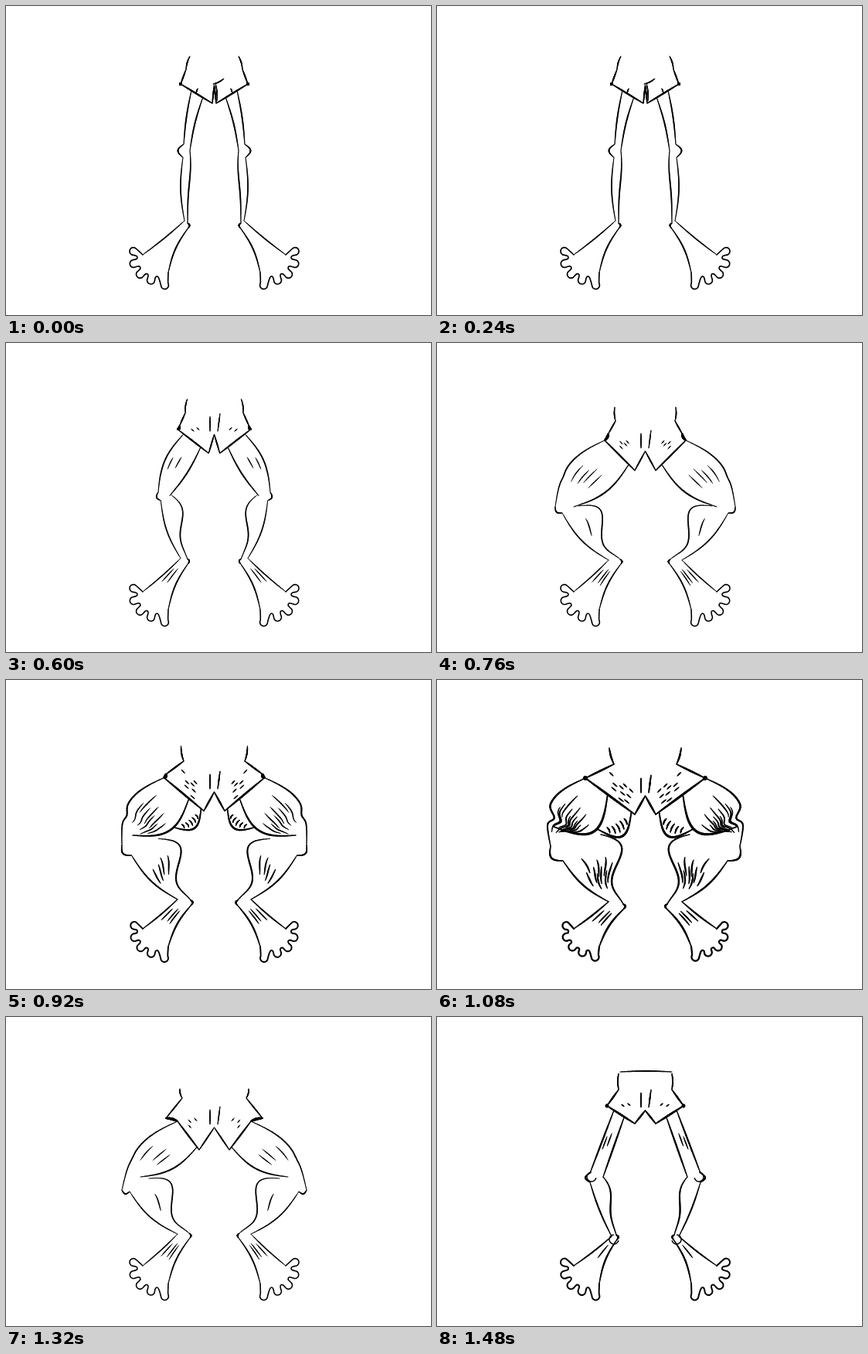
An HTML page with a canvas for the animation above (1.52 s loop, 550 by 400 pixels).

```html
<!DOCTYPE html>
<html lang="en">
<head>
<meta charset="utf-8">
<title>Squat</title>
<style>
html, body { margin: 0; width: 100%; height: 100%; overflow: hidden; background: #fff; }
canvas { display: block; width: 550px; height: 400px; }
</style>
</head>
<body>
<canvas id="stage" width="550" height="400"></canvas>
<script>
const LOOP = 1520, STEP = 40, AXIS = 539;
const ROOT = [177, 322], ARCH = [210, 345], SOLE = [195, 325];
const ctx = document.getElementById('stage').getContext('2d');

// Joints of the left leg. thigh, lower: how far the outer and inner lines bow inwards.
// grip: where the thigh meets the hem, from 0 (outside) to 1 (inside).
const stand = {
  ink: 1.7, muscle: 0, bone: 0, toe: 1, knob: -7,
  waist: [238, 65], belt: [233, 82], hip: [226, 101],
  hemOut: [226, 101], hemIn: [267, 126], crotch: 102, grip: [.34, .7],
  kneeOut: [230, 179], kneeIn: [238, 187], shin: [229, 196], calf: [238, 187],
  ankleOut: [231, 278], ankleIn: [235, 281], thigh: [-1.5, -2], lower: [-4, 2]
};
const thin = { ...stand, ink: 1.6, knob: -4, shin: [229, 192], ankleOut: [229, 277], ankleIn: [233, 279] };
const squat = {
  ink: 1.6, muscle: .4, bone: 0, toe: 1, knob: -4,
  waist: [230, 83], belt: [231, 101], hip: [222, 117],
  hemOut: [217, 126], hemIn: [256, 165], crotch: 140, grip: [0, .8],
  kneeOut: [153, 212], kneeIn: [177, 212], shin: [162, 220], calf: [183, 211],
  ankleOut: [222, 281], ankleIn: [237, 280], thigh: [-18, 10], lower: [-7, 26]
};
const strong = {
  ink: 2.3, muscle: 1, bone: 0, toe: .93, knob: -9,
  waist: [223, 88], belt: [229, 109], hip: [192, 127],
  hemOut: [192, 127], hemIn: [256, 174], crotch: 150, grip: [0, .45],
  kneeOut: [147, 215], kneeIn: [151, 190], shin: [163, 234], calf: [212, 200],
  ankleOut: [222, 287], ankleIn: [241, 290], thigh: [-25, 32], lower: [-6, 28]
};
const soft = {
  ...squat, muscle: .3, waist: [225, 93], belt: [228, 105], hip: [207, 131],
  hemOut: [222, 135], hemIn: [250, 172], crotch: 143, grip: [0, .9],
  kneeOut: [150, 224], kneeIn: [174, 207], shin: [160, 226], calf: [185, 209]
};
const bony = {
  ...stand, ink: 2, muscle: .15, bone: 6, knob: -6,
  waist: [235, 73], belt: [235, 94], hip: [220, 115],
  hemOut: [220, 115], hemIn: [256, 138], crotch: 121, grip: [.25, .62],
  kneeOut: [198, 202], kneeIn: [215, 207], shin: [198, 214], calf: [215, 207],
  ankleOut: [226, 284], ankleIn: [232, 282], thigh: [0, 0], lower: [-2, 7]
};

const TRACK = [[0, stand], [280, stand], [440, thin], [480, thin], [760, squat], [1080, strong],
  [1140, strong], [1320, soft], [1480, bony], [LOOP, stand]];

const lerp = (a, b, k) => a + (b - a) * k;
const mix = (a, b, k) => Array.isArray(a) ? a.map((v, i) => lerp(v, b[i], k)) : lerp(a, b, k);
const blend = (a, b, k) => Object.fromEntries(Object.keys(a).map(n => [n, mix(a[n], b[n], k)]));
const noise = i => { const v = Math.sin(i * 12.9898 + 4) * 43758.5453; return v - Math.floor(v); };

const arc = u => Math.sin(Math.PI * u);
const ripple = u => Math.sin(1.8 * Math.PI * u) * (1 - u);

// Line from a to b, pushed sideways by bulge times the profile.
function bow(a, b, bulge = 0, profile = arc, n = 40) {
  const dx = b[0] - a[0], dy = b[1] - a[1], len = Math.hypot(dx, dy) || 1;
  return Array.from({ length: n + 1 }, (_, i) => {
    const u = i / n, d = bulge * profile(u) / len;
    return [a[0] + dx * u + dy * d, a[1] + dy * u - dx * d];
  });
}

// Part of a line lying between two others.
const strand = (a, b, s, u0, u1) => a.map((p, i) => mix(p, b[i], s))
  .slice(Math.round(u0 * (a.length - 1)), Math.round(u1 * (a.length - 1)) + 1);

function ink(pts, width) {
  const n = pts.length - 1;
  for (let i = 0; i < n; i++) {
    ctx.lineWidth = width * (.6 + .5 * arc((i + .5) / n));
    ctx.beginPath();
    ctx.moveTo(...pts[i]);
    ctx.lineTo(...pts[i + 1]);
    ctx.stroke();
  }
}

function blank(pts) {
  ctx.beginPath();
  pts.forEach(p => ctx.lineTo(...p));
  ctx.fill();
}

function hatch(a, b, count, from, spread, length, width) {
  for (let i = 0; i < count; i++) {
    const u = from + spread * noise(i);
    ink(strand(a, b, .15 + .7 * ((.5 + i * .618) % 1), u, Math.min(u + length, .95)), width);
  }
}

function ring([x, y], r, width) {
  ctx.lineWidth = width;
  ctx.beginPath();
  ctx.arc(x, y, r, .3, 4.6);
  ctx.stroke();
}

// Five round toes fanned about the sole, joined by webs.
function toes(size, width) {
  const polar = (r, deg, [x, y] = SOLE) =>
    [x + r * Math.cos(deg * Math.PI / 180), y + r * Math.sin(deg * Math.PI / 180)];
  const pts = [ROOT];
  for (let i = 0; i < 5; i++) {
    const deg = 194 - 30 * i, tip = polar((i < 4 ? 36 : 43) * size - 5, deg);
    for (let turn = 110; turn >= -110; turn -= 22) pts.push(polar(5, deg + turn, tip));
    if (i < 4) pts.push(polar(25, deg - 11), polar(25, deg - 19));
  }
  pts.push(ARCH);
  ctx.lineWidth = width;
  ctx.beginPath();
  ctx.moveTo(...ROOT);
  for (let i = 1; i < pts.length - 1; i++) ctx.quadraticCurveTo(...pts[i], ...mix(pts[i], pts[i + 1], .5));
  ctx.lineTo(...ARCH);
  ctx.stroke();
}

function drawLeg(p) {
  const w = p.ink, m = p.muscle, fine = w * .75;
  const hem = u => mix(p.hemOut, p.hemIn, u);

  // foot
  const heel = [p.ankleIn[0] + 1, p.ankleIn[1] + 6];
  const top = bow(p.ankleOut, ROOT, 1), instep = bow(heel, ARCH, -4);
  ink(top, w * .85);
  ink(bow(p.ankleIn, heel, 2), w);
  ink(instep, w);
  toes(p.toe, w);
  hatch(top, instep, Math.round(3 * Math.min(1, 3 * m)), .12, .2, .35, fine);

  // lower leg
  const shin = bow(p.shin, p.ankleOut, p.lower[0]);
  const calf = bow(p.calf, p.ankleIn, p.lower[1], ripple);
  ink(shin, w * .9);
  ink(calf, w);
  hatch(shin, calf, Math.round(9 * m * m), .08, .4, .25, w * .9);

  // thigh, with a notch where the side muscle ends
  const out = bow(hem(p.grip[0]), p.kneeOut, p.thigh[0],
    u => arc(u) - .4 * m * m * Math.exp(-(((u - .65) / .07) ** 2)));
  const inner = bow(hem(p.grip[1]), p.kneeIn, p.thigh[1]);
  if (m > .6) {
    const edge = bow(hem(.93), inner[17], 0), lobe = bow(hem(.93), inner[17], 23 * m);
    blank(lobe);
    ink(lobe, w * 1.15);
    for (let i = 1; i < 6; i++) {
      const k = 5 + i * 5;
      ink(bow(mix(edge[k], lobe[k], .1 + .2 * noise(i)), mix(edge[k], lobe[k], .75), 1), fine);
    }
  }
  blank([...out, ...inner.slice().reverse()]);
  ink(out, w);
  ink(inner, w * (1 + .25 * m));
  ink(bow(p.kneeOut, p.shin, p.knob), w * .9);
  hatch(out, inner, Math.round(11 * m), .18, .35, .16 + .2 * m, fine);

  // shorts
  const side = bow(p.belt, p.hip), edge = bow(p.hemOut, p.hemIn);
  ink(bow(p.waist, p.belt, -1), w * .9);
  ink(side, w);
  ink(bow(p.hip, p.hemOut, 1), w * 2);
  ink(edge, w * 1.2);
  ink(bow(p.hemIn, [269.5, p.crotch]), w);
  hatch(bow(p.belt, [264, p.crotch]), edge, Math.round(10 * m), .05, .7, .1, fine);
  if (!m) ink(bow([246, 112], [248, 107]), fine);

  if (p.bone > 3) {
    ring([p.kneeOut[0] + 2, p.kneeOut[1] + 5], p.bone, fine);
    ring([p.ankleOut[0] + 3, p.ankleOut[1] + 4], p.bone, fine);
  }
}

function drawFly(p) {
  const y = p.crotch, w = p.ink * .85;
  if (p.muscle < .1) {
    ink(bow([268, y - 1], [282, y - 8], -1), w);
    ink(bow([271, y - 2], [273, y + 21], 1), w);
    return;
  }
  ink(bow([264, y - 23], [264, y - 4]), w);
  ink(bow([277, y - 27], [274, y - 4]), w);
  if (p.bone > 3) ink(bow([237, 71], [304, 71], 1), w);
}

function draw(time) {
  const t = Math.floor(time % LOOP / STEP) * STEP;
  const i = TRACK.findIndex(k => k[0] > t);
  const [t0, a] = TRACK[i - 1], [t1, b] = TRACK[i];
  const pose = blend(a, b, (t - t0) / (t1 - t0));

  ctx.setTransform(1, 0, 0, 1, 0, 0);
  ctx.fillStyle = '#fff';
  ctx.fillRect(0, 0, 550, 400);
  ctx.strokeStyle = '#000';
  ctx.lineCap = ctx.lineJoin = 'round';
  for (const flip of [1, -1]) {
    ctx.setTransform(flip, 0, 0, 1, flip < 0 ? AXIS : 0, 0);
    drawLeg(pose);
  }
  ctx.setTransform(1, 0, 0, 1, 0, 0);
  drawFly(pose);
}

const start = performance.now();
function tick() {
  draw(performance.now() - start);
  requestAnimationFrame(tick);
}
tick();
</script>
</body>
</html>
```
